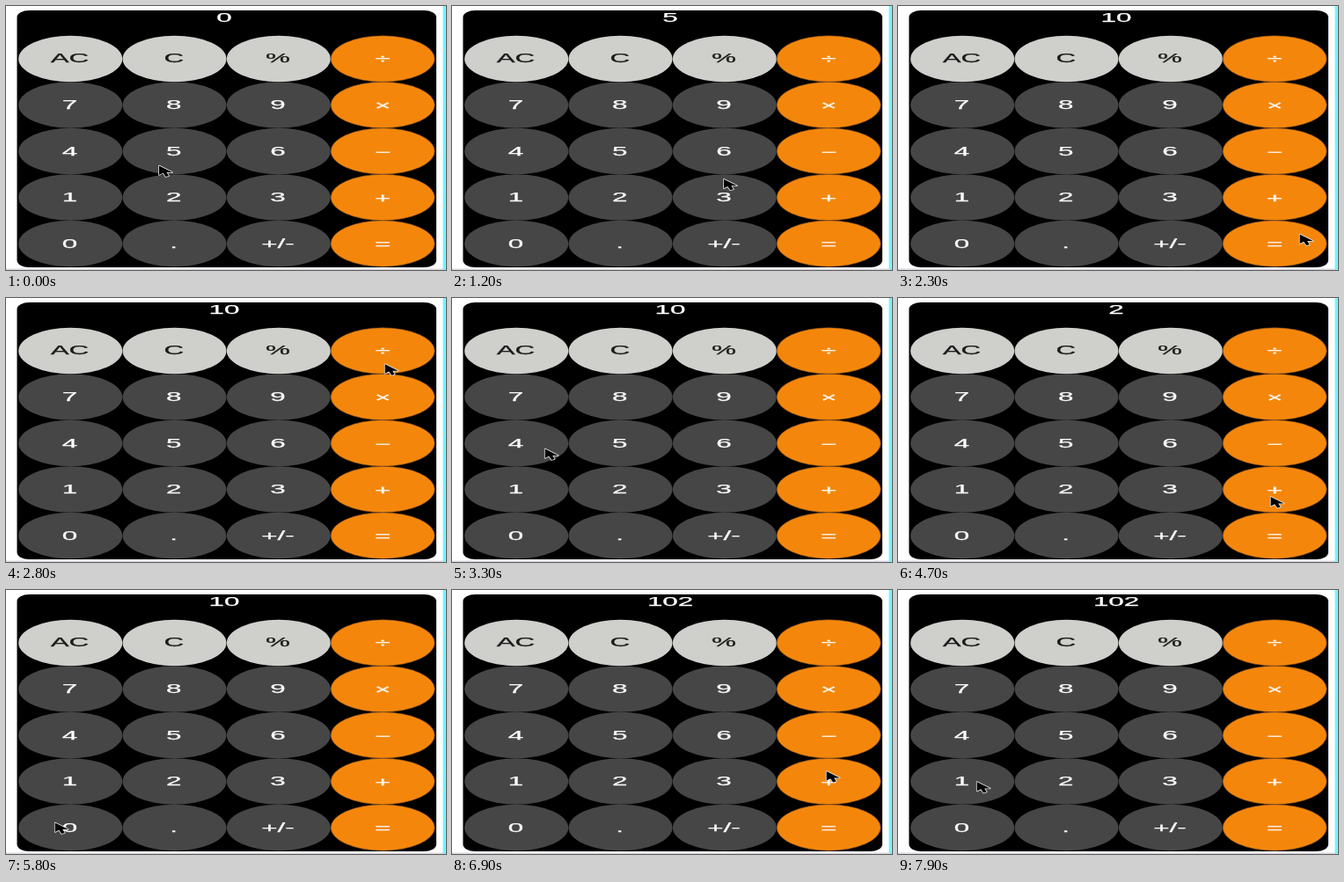
Animation of 500x300 px, one loop 8000 ms. Source, as an HTML page with a canvas:

```html
<!DOCTYPE html>
<html lang="en">
<head>
<meta charset="utf-8">
<title>Calculator</title>
<style>
  html, body { margin: 0; width: 100%; height: 100%; overflow: hidden; background: #fff; }
  canvas { display: block; }
</style>
</head>
<body>
<canvas id="stage" width="500" height="300"></canvas>
<script>
const ctx = document.getElementById('stage').getContext('2d');
const LOOP = 8000, STEP = 100, TRAVEL = 600;
const WIDEN = 2.13; // the whole screen is shown wider than tall

const ROWS = ['AC C % ÷', '7 8 9 ×', '4 5 6 −', '1 2 3 +', '0 . +/- ='];
const KEYS = ROWS.flatMap((labels, row) => labels.split(' ').map((label, col) => ({
  label, row, col, x: 73.2 + col * 118.3, y: 60 + row * 52.5,
})));

// Keys the pointer visits, with its arrival time and distance from the key's centre
const VISITS = [
  visit(0, '5', -18, 16), visit(300, '+', -3, 10), visit(1500, '5'), visit(2200, '=', 28, -11),
  visit(2900, '÷'), visit(3300, '4', 32, 6), visit(3600, '5'), visit(4200, '='),
  visit(4700, '+', -5, 8), visit(5400, '1'), visit(5800, '0', -18, -6), visit(6500, '='),
  visit(6900, '+', -3, -12), visit(7200, '÷'), visit(7700, '1', 16, 0),
];

const READOUT = [
  { from: 0, shows: '0' }, { from: 500, shows: '5' }, { from: 2200, shows: '10' },
  { from: 3600, shows: '5' }, { from: 4500, shows: '2' }, { from: 5400, shows: '1' },
  { from: 5800, shows: '10' }, { from: 6000, shows: '100' }, { from: 6600, shows: '102' },
];

function visit(at, label, dx = 0, dy = 0) {
  const key = KEYS.find(k => k.label === label);
  return { at, x: key.x + dx, y: key.y + dy };
}

function text(label, x, baseline, color) {
  ctx.save();
  ctx.translate(x, baseline);
  ctx.scale(WIDEN, 1);
  ctx.font = '14.7px "Liberation Sans", Arial, sans-serif';
  ctx.textAlign = 'center';
  ctx.fillStyle = ctx.strokeStyle = color;
  ctx.lineWidth = 0.25;
  ctx.fillText(label, 0, 0);
  ctx.strokeText(label, 0, 0);
  ctx.restore();
}

function drawKey({ label, row, col, x, y }) {
  const isOperator = col === 3, isTop = row === 0 && !isOperator;
  ctx.fillStyle = isOperator ? '#f4870b' : isTop ? '#cfcfcb' : '#464646';
  ctx.beginPath();
  ctx.ellipse(x, y, 59, 26.2, 0, 0, Math.PI * 2);
  ctx.fill();
  if (isOperator) {
    ctx.strokeStyle = 'rgba(110, 65, 40, 0.6)';
    ctx.lineWidth = 1;
    ctx.stroke();
  }
  const baseline = 64.4 + row * 52.6 + (isOperator ? 1 : 0);
  text(label, x - (isOperator ? 0 : 0.8), baseline, isTop ? '#1c1c1c' : '#fafafa');
}

function drawFrame() {
  ctx.fillStyle = '#fff';
  ctx.fillRect(0, 0, 500, 300);
  ctx.fillStyle = '#d9d4de';
  ctx.fillRect(0, 298.5, 497, 1.5);
  ctx.fillStyle = '#74f3fb';
  ctx.fillRect(496.5, 0, 3.5, 300);
  ctx.fillStyle = '#000';
  ctx.beginPath();
  ctx.roundRect(12.5, 5, 476.5, 292, { x: 14, y: 8 });
  ctx.fill();
}

function drawPointer({ x, y }) {
  ctx.save();
  ctx.translate(x + 0.5, y + 0.5);
  ctx.lineJoin = 'round';
  ctx.lineWidth = 1.6;
  ctx.strokeStyle = '#e8e8e8';
  ctx.fillStyle = '#000';
  const arrow = new Path2D('M0 0V10.5L4.5 8.2L7.5 12.5L11 11.5L8.5 7.5H15Z');
  ctx.stroke(arrow);
  ctx.fill(arrow);
  ctx.restore();
}

function pointerAt(t) {
  const next = VISITS.findIndex(v => v.at > t);
  if (next < 0) return VISITS[VISITS.length - 1];
  const a = VISITS[next - 1], b = VISITS[next];
  const duration = Math.min(TRAVEL, b.at - a.at);
  const u = Math.max(0, 1 - (b.at - t) / duration), ease = u * u * (3 - 2 * u);
  return { x: a.x + (b.x - a.x) * ease, y: a.y + (b.y - a.y) * ease };
}

function render(t) {
  drawFrame();
  KEYS.forEach(drawKey);
  text(READOUT.filter(r => r.from <= t).pop().shows, 248, 18, '#fff');
  drawPointer(pointerAt(t));
}

const start = performance.now();
function tick() {
  const elapsed = (performance.now() - start) % LOOP;
  render(Math.floor(elapsed / STEP) * STEP);
  requestAnimationFrame(tick);
}
tick();
</script>
</body>
</html>
```
